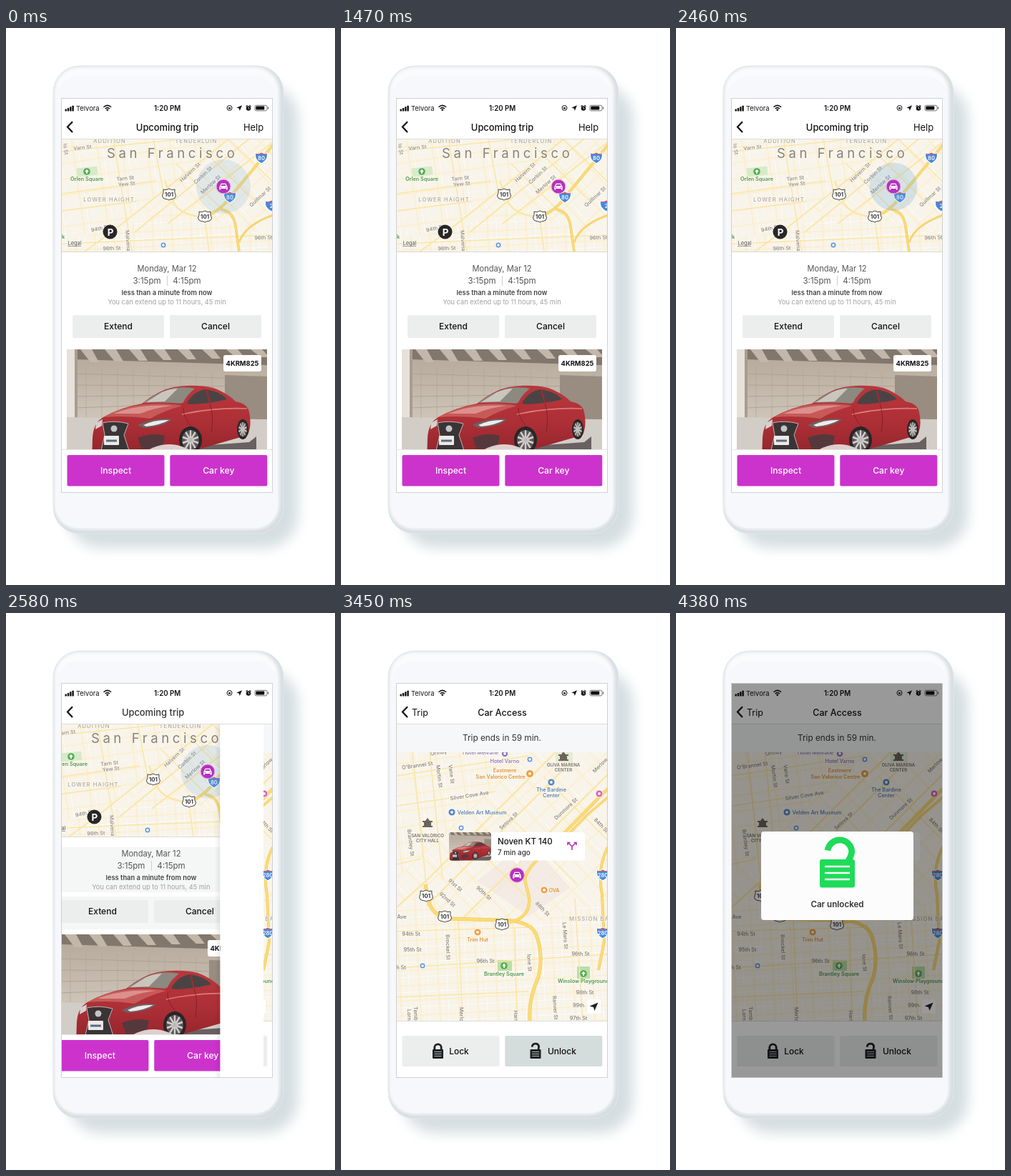
An HTML page that plays this animation: 460x780 px, repeating every 4500 ms.

```html
<!DOCTYPE html>
<html lang="en">
<head>
<meta charset="utf-8">
<title>Car access</title>
<style>
html, body { margin: 0; width: 100%; height: 100%; overflow: hidden; background: #fff; }
svg { display: block; width: 460px; height: 780px; font-family: Inter, Roboto, sans-serif; }
.halo { paint-order: stroke; stroke: #faf6ec; stroke-width: 1.6px; stroke-linejoin: round; }
</style>
</head>
<body>
<svg id="stage" viewBox="0 0 460 780" xmlns="http://www.w3.org/2000/svg"></svg>
<script>
const LEFT = 78, WIDTH = 295, LOOP = 4500;

const text = (x, y, s, size, o = {}) =>
  `<text x="${x}" y="${y}" font-size="${size}" font-weight="${o.w || 400}" fill="${o.c || '#111'}"
    text-anchor="${o.a || 'middle'}" letter-spacing="${o.ls || 0}" class="${o.k || ''}"
    ${o.r ? `transform="rotate(${o.r} ${x} ${y})"` : ''}>${s}</text>`;
const box = (x, y, w, h, fill, r = 0, more = '') =>
  `<rect x="${x}" y="${y}" width="${w}" height="${h}" rx="${r}" fill="${fill}" ${more}/>`;
const dot = (x, y, r, fill, more = '') => `<circle cx="${x}" cy="${y}" r="${r}" fill="${fill}" ${more}/>`;
const fill = (d, c, more = '') => `<path d="${d}" fill="${c}" ${more}/>`;
const line = (d, c, w, more = '') => `<path d="${d}" fill="none" stroke="${c}" stroke-width="${w}" ${more}/>`;
const at = (x, y, s, k = 1) => `<g transform="translate(${x} ${y}) scale(${k})">${s}</g>`;
const road = (d, w) => line(d, '#efc65e', w, 'stroke-linejoin="round"') + line(d, '#fbdb74', w - 1, 'stroke-linejoin="round"');
const street = (d, w = 1.5) => line(d, '#fbe6a6', w);

// Map labels: [text, x, y, rotation]
const labels = (list, c, size = 7.3, w = 500, ls = 0) =>
  list.map(([s, x, y, r]) => text(x, y, s, size, { c, w, r, ls, k: 'halo' })).join('');

const grid = (id, w, h, angle) => `<pattern id="${id}" patternUnits="userSpaceOnUse" width="${w}" height="${h}"
  patternTransform="rotate(${angle})">
  ${line(`M0 ${h / 2}H${w}M${w / 2} 0V${h}M${w / 4} 0V${h}`, '#f0eadc', 1.5)}
  ${line(`M0 ${h / 2}H${w}M${w / 2} 0V${h}M${w / 4} 0V${h}`, '#fff', .9)}
  ${line(`M0 1H${w}M1 0V${h}`, '#fbebbc', 1.1)}</pattern>`;

const interstate = (x, y, n) => at(x, y,
  fill('M-8-6Q-4-4 0-7Q4-4 8-6Q11 3 0 9Q-11 3-8-6Z', '#4a88d8', 'stroke="#fff" stroke-width="1.2"') +
  fill('M-8-5.5Q-4-4 0-6.5Q4-4 8-5.5L8.1-4.2H-8.1Z', '#d2605a') +
  text(0, 3.8, n, 7.6, { c: '#fff', w: 600 }));
const route = (x, y) => at(x, y,
  fill('M-8-7Q-4-5 0-8Q4-5 8-7Q7-3 9.5 2Q9 6 5 6.5Q2 6.5 0 8Q-2 6.5-5 6.5Q-9 6-9.5 2Q-7-3-8-7Z',
    '#fff', 'stroke="#444" stroke-width="1"') +
  text(0, 3, '101', 7.8, { c: '#333', w: 700 }));
const poi = (x, y, c, r = 4.5) => dot(x, y, r, c, 'stroke="#fff" stroke-width=".8"') +
  box(x - 1.7, y - 1.7, 3.4, 3.4, '#fff', 1);
const tree = (x, y) => dot(x, y, 4.8, '#56aa57') + fill(`M${x} ${y - 3.2}l3 3.4h-2v2.6h-2v-2.6h-2z`, '#fff');
const hall = (x, y) => fill(`M${x - 7} ${y + 6}v-2h2v-5h-2v-2h4l3-4l3 4h4v2h-2v5h2v2z`, '#6b645c');
const carPin = (x, y, r) => dot(x, y, r, '#b731bd', 'stroke="#e3b5e3" stroke-width="1"') + at(x, y,
  fill('M-3.4-4.2H3.4L4.8-1Q5.7-.3 5.7.8V4.4H3.8V3H-3.8V4.4H-5.7V.8Q-5.7-.3-4.8-1Z', '#fff') +
  fill('M-2.7-3.1H2.7L3.6-.9H-3.6Z', '#b731bd') + dot(-3.6, 1.2, .8, '#b731bd') + dot(3.6, 1.2, .8, '#b731bd'));

const padlock = (x, open) => at(x, 0,
  line(open ? 'M-4.8 607.6A4.8 4.8 0 0 1 4.6 606.5Q4.8 609 3.6 612' : 'M-4.7 613V608.5A4.7 4.7 0 0 1 4.7 608.5V613', '#1d2021', 2.8) +
  box(-7.5, 611, 15, 13, '#1d2021', 1) +
  line('M-5 614.5H5M-5 617.5H5M-5 620.5H5', '#c9cfce', .9));

const wall = () => {
  let s = '';
  for (let i = 0; i < 5; i++) s += line(`M97 ${484 + i * 16}L365 ${492 + i * 10}`, '#a79d91', .8);
  for (let i = 0; i < 12; i++) s += line(`M${112 + i * 22} ${474 + i}V546`, '#b0a69a', .7);
  for (let i = 0; i < 8; i++) s += fill(`M${104 + i * 34} 450h16l10 ${18 - i}h-12z`, '#c2b7a9');
  return s;
};
const wheel = (x, y, rx, ry) => {
  let spokes = '';
  for (let a = 0; a < 10; a++) spokes += line('M0 0L0-.72', '#d2cfcd', .15, `transform="rotate(${a * 36})"`);
  return `<g transform="translate(${x} ${y}) scale(${rx} ${ry})">${dot(0, 0, 1, '#2b2527')}
    ${dot(0, 0, .74, '#5e585a')}${spokes}${dot(0, 0, .18, '#bbb')}</g>`;
};
const photo = () => box(85, 450, 280, 154, 'url(#wallTone)') +
  fill('M97 450H365V472L97 464Z', '#82776d') + wall() +
  fill('M306 486L365 488V548H306Z', '#998c80') +
  box(85, 450, 11, 104, '#e6e1d9') + box(96, 450, 4, 104, '#a89d91') +
  fill('M85 545L365 548V604H85Z', '#d2cdc6') +
  fill('M116 596L340 580L350 572V604H116Z', '#696161') +
  fill('M120 604L121 574Q122 553 136 545Q161 531 190 526Q214 507 234 503Q264 498 290 504Q309 511 321 523Q338 526 340 538Q344 556 338 570L276 588L232 600Z', 'url(#paint)') +
  fill('M136 545Q163 530 193 527Q226 525 246 529Q220 536 202 547Q168 542 136 545Z', '#c65a59') +
  fill('M150 540Q172 531 200 529Q222 528 232 529Q206 532 188 540Z', '#dc908c') +
  fill('M192 525Q216 507 236 504Q251 502 264 505Q252 514 247 526Q218 523 192 525Z', '#8c8980') +
  fill('M196 524L218 510Q230 505 240 505L222 523Z', '#c9c7bd') +
  fill('M252 527Q261 509 279 506Q300 509 309 520Q283 527 252 527Z', '#4a4344') +
  line('M280 506L285 525', '#a8282f', 2) +
  line('M246 541Q292 531 337 533', '#df7b78', 1.6) +
  line('M248 529Q246 552 275 571M285 526Q291 542 287 566', '#7d1b23', .8) +
  fill('M244 526q8-4 12 1q-1 6-9 5z', '#b33036') +
  fill('M184 556Q206 545 232 548Q222 558 192 560Z', '#6d6164') +
  fill('M192 556Q208 548 228 549Q216 556 196 558Z', '#efecea') +
  fill('M126 553L135 548L134 557L125 562Z', '#d6d0cf') +
  fill('M135 553Q152 549 171 554L165 570L176 604H130L138 570Z', '#3a3437', 'stroke="#bdb5b4" stroke-width="1"') +
  dot(151, 561, 4.5, '#c4c4c6') +
  box(137, 571, 21, 13, '#eceae4', 1) + line('M140 578H155', '#586a88', 3) +
  fill('M184 574Q204 566 222 571L219 586L190 590Z', '#55383c') +
  wheel(258, 577, 16, 19) + wheel(331, 562, 8, 14);

const statusBar = () => [0, 1, 2, 3].map(i => box(82.5 + i * 3.3, 113.5 - i * 1.6, 2.4, 3 + i * 1.6, '#111', .5)).join('') +
  text(98, 115.8, 'Telvora', 9.35, { a: 'start' }) +
  line('M136.5 110.8Q141.8 106 147.1 110.8M138.6 113Q141.8 110.2 145 113', '#111', 1.5) +
  fill('M139.9 114.2Q141.8 112.6 143.7 114.2L141.8 116.4Z', '#111') +
  text(225.6, 115.8, '1:20 PM', 9.7, { w: 600 }) +
  dot(312.5, 112, 3.5, 'none', 'stroke="#111" stroke-width="1"') + box(311, 111.3, 3, 2.2, '#111') +
  fill('M330 108.3L326.8 116L325.8 112.6L322.2 111.8Z', '#111') +
  dot(339, 112.5, 3.2, '#111') + line('M335.6 109.8l2-1.5M342.4 109.8l-2-1.5', '#111', 1.1) +
  line('M339 110.7V112.7L340.4 113.3', '#fff', .8) +
  box(348, 108.3, 17, 7.6, 'none', 1.8, 'stroke="#555" stroke-width=".8"') +
  box(349.3, 109.6, 12, 5, '#111', .8) + box(366, 110.6, 1.2, 3, '#666', .5);

const tripMap = () => box(78, 155, 295, 158, '#f9f4e9') +
  fill('M78 155H312L150 284L78 296Z', 'url(#west)') +
  fill('M312 155H373V290L278 266L238 248L180 262Z', 'url(#soma)') +
  fill('M78 296L150 284L238 250L278 268L373 292V313H78Z', 'url(#south)') +
  box(99, 195, 29, 12, '#d6ebc9', 0, 'transform="rotate(-6 113 201)"') +
  street('M78 173L280 152M78 232L210 214M78 256L182 243M150 155L176 313M206 155L222 240M278 268L284 313M78 302L373 290') +
  street('M110 313L150 284L312 155M180 286L340 155M226 274L373 160', 2) +
  street('M238 190L310 262M270 165L350 245M310 155L373 215') +
  street('M222 214L232 240Q240 262 278 265', 2.4) +
  road('M278 265Q302 254 313 237L357 184L373 164', 4) +
  road('M300 254Q318 256 321 278L326 313', 3.6) +
  road('M326 300Q334 276 373 262', 2.6) +
  labels([['ADDITION', 145, 161], ['TENDERLOIN', 266, 161], ['LOWER HAIGHT', 144, 243]], '#a09a92', 7.6, 400, 1.1) +
  text(141, 182, 'San Francisco', 18.5, { a: 'start', c: '#85817c', ls: 4.6, k: 'halo' }) +
  labels([['Varn St', 107, 170, -6], ['Tarn St', 167, 213, -6], ['Yew St', 169, 221, -6], ['Halvern St', 259, 204, -43],
    ['Corbin St', 277, 208, -43], ['Merlow St', 288, 221, -43], ['Quillmar St', 357, 238, -43], ['94th St', 132, 283, -12],
    ['Malvena', 168, 298, 86], ['96th St', 148, 311, -2], ['96th St', 360, 296, -2], ['lo St', 81, 170, 82]], '#8f8880') +
  labels([['Orlen Square', 113, 214], ['k', 80, 295]], '#4d9a4f', 7.3, 600) + tree(113, 201) +
  text(96, 304, 'Legal', 7.4, { c: '#555', k: 'halo' }) + line('M86 305.5H105', '#666', .6) +
  poi(220, 304, '#5b90d2', 4) + route(228, 233) + route(278, 264) +
  interstate(357, 181, '80') + interstate(313, 236, '80') + interstate(371, 248, '2') +
  dot(145.5, 285.5, 10, '#272727') + text(146, 290.5, 'P', 13.5, { c: '#fff', w: 700 }) +
  `<circle id="pulse" cx="304" cy="222" fill="#62a3d6"/>` + carPin(304, 222, 10);

const greyButton = (x, s) => box(x, 402, 128, 32, '#eceeee', 2) + text(x + 64, 422.3, s, 12, { w: 500 });
const pinkButton = (x, s) => box(x, 598, 136, 43.5, '#cc33cc', 2) + text(x + 68, 624, s, 12.2, { c: '#fff', w: 500 });

const tripScreen = () => box(78, 155, 295, 496, '#fff') + tripMap() + line('M78 313.5H373', '#d9d9d9', 1) +
  `<g id="shade">${box(78, 328, 295, 63, '#f5f6f6')}${box(78, 397, 295, 46, '#f5f6f6')}</g>` +
  text(225, 341, 'Monday, Mar 12', 11.1, { c: '#555' }) +
  text(197, 358.3, '3:15pm', 11.5, { c: '#555' }) + text(253, 358.3, '4:15pm', 11.5, { c: '#555' }) +
  line('M225.5 347V361', '#ccc', 1) +
  text(225, 374.3, 'less than a minute from now', 9.35, { w: 600, c: '#444' }) +
  text(225, 386.5, 'You can extend up to 11 hours, 45 min', 9.25, { c: '#a0a0a0' }) +
  greyButton(93, 'Extend') + greyButton(229, 'Cancel') +
  `<g clip-path="url(#photoClip)"><use href="#photo"/>${dot(228, 639, 56, '#e9e6e3', 'opacity=".88"')}</g>` +
  box(304, 458, 53, 23, '#fff', 3) + text(330.5, 473.2, '4KRM825', 9.4, { w: 700 }) +
  box(78, 590, 295, 61, '#fff') + line('M78 590.5H373', '#e6e6e6', 1) +
  pinkButton(85.5, 'Inspect') + pinkButton(229.3, 'Car key');

const accessMap = () => box(78, 195, 295, 376, '#f9f4e9') +
  fill('M78 195H262L78 372Z', 'url(#west)') +
  fill('M262 195H373V400L262 436L150 428L118 390L78 410V372Z', 'url(#soma)') +
  fill('M78 410L118 390L150 428L262 436L373 400V571H78Z', 'url(#south)') +
  fill('M300 195h24v14h-24z', '#e4ecd2') + fill('M190 375L262 318L320 385L262 425Z', '#f0e6e2', 'opacity=".6"') +
  box(219, 486, 20, 15, '#b9dfa6') + box(330, 495, 18, 17, '#b9dfa6') +
  street('M78 228L262 200M78 270L216 250M78 352L112 344M124 195L142 372M100 195L120 390') +
  street('M78 412L118 376L300 195M120 410L320 210M170 428L373 226', 2.4) +
  street('M180 320L262 400M226 275L330 380M284 230L373 318') +
  street('M78 446L262 440M78 497L373 478M164 430L170 571M243 440L246 571M327 400L338 571M78 538L262 530') +
  road('M118 380L121 398Q126 424 150 428L222 430Q262 430 272 448Q284 478 276 510Q262 540 264 571', 5) +
  road('M232 434Q266 428 263 398L257 374Q258 360 284 336L330 290L373 246', 4.4) +
  road('M314 314L344 283L373 258', 3.4) + road('M373 328Q358 356 365 395L368 460L360 500', 4) +
  labels([['Ormby', 137, 198, -8], ["O'Brannel St", 107, 216, -8], ['Mortin St', 135, 229, 83], ['Vane St', 152, 226, 83],
    ['Silver Cove Ave', 180, 258, -9], ['Brantley St', 95, 322, 83], ['Selova St', 236, 293, -43], ['Dunmore St', 316, 276, -43],
    ['Merlow', 364, 215, -45], ['84th St', 362, 299, 46], ['90th St', 198, 394, 42], ['91st St', 158, 383, 42],
    ['92nd St', 147, 403, 42], ['88th St', 280, 416, 46]], '#857e76') +
  labels([['Ave', 85, 428], ['94th St', 98, 452], ['95th St', 100, 474], ['h St', 84, 499], ['96th St', 202, 490],
    ['96th St', 335, 480], ['Brockel St', 147, 468, 88], ['Ione St', 261, 490, 86], ['Le Maro St', 311, 452, 86],
    ['98th St', 341, 534], ['99th', 332, 552], ['97th St', 332, 570], ['Ranver St', 297, 553, 86], ['Lorn', 93, 563, 88],
    ['Tembl', 102, 562, 88], ['Merlo', 166, 562, 88], ['Harn', 242, 565, 88]], '#857e76') +
  labels([['Hotel Melvane', 195, 198], ['Hotel Varno', 229, 210]], '#8570bb', 7.3, 500) +
  labels([['Eastmere', 229, 223], ['San Valorico Centre', 223, 232], ['Trim Hut', 191, 460], ['OVA', 298, 391]], '#e0913a', 7.2, 600) +
  labels([['The Bardine', 294, 249.5], ['Center', 294, 258], ['Velden Art Museum', 197, 282]], '#4d78ad', 7.3, 500) +
  labels([['OLIVA MARENA', 311, 214.5], ['CENTER', 311, 221.5], ['SAN VALORICO', 121, 313.5], ['CITY HALL', 121, 321]], '#776f66', 6.1, 600) +
  labels([['Brantley Square', 228, 508], ['Winslow Playground', 339, 517.5]], '#4d9a4f', 7.3, 600) +
  text(319, 431, 'MISSION BAY', 7.7, { a: 'start', c: '#a09a92', ls: 1.1, k: 'halo' }) +
  poi(229, 197, '#8570bb') + poi(264, 205, '#5b90d2', 4) + poi(264, 225, '#eca042', 5.5) + poi(294, 237, '#5b86bf', 5) +
  poi(155, 279, '#5b86bf', 5) + poi(168, 301, '#5b90d2', 4) + poi(361, 253, '#d668ae', 5) + poi(284, 388, '#eca042', 5) +
  poi(191, 447, '#eca042', 5) + poi(114, 494, '#5b90d2', 4) + hall(311, 201) + hall(121, 294) +
  tree(228, 494) + tree(339, 505) + route(119, 396) + route(145, 425) + route(225, 436) +
  interstate(366, 366, '280') + interstate(366, 447, '280') +
  box(344, 541, 19, 20, '#fff', 2) + fill('M359.5 545.5L354.5 557L353 552L347.5 550.5Z', '#222');

const accessScreen = () => box(78, 155, 295, 496, '#fff') +
  `<g clip-path="url(#mapClip)">${accessMap()}</g>` + line('M78 571.5H373', '#ddd', 1) +
  box(78, 155, 295, 40, '#f6f7f8') + text(225, 179, 'Trip ends in 59 min.', 11.8, { c: '#333' }) +
  box(151, 307, 190, 39.5, '#fff', 4) + fill('M241 346H251L246 352Z', '#fff') +
  `<g clip-path="url(#thumbClip)"><use href="#photo" transform="translate(120.8 190) scale(.26)"/></g>` +
  text(219, 324, 'Noven KT 140', 11.5, { a: 'start', w: 500 }) + text(219, 338.5, '7 min ago', 9.9, { a: 'start', w: 500, c: '#333' }) +
  line('M323 332V327L318 322M323 327L328 322M317 325V321.5H320.5M325.5 321.5H329V325', '#b731bd', 1.6) +
  carPin(246, 367, 10.3) +
  box(85.5, 592, 136, 43, '#eceeee', 2) + box(229.3, 592, 136, 43, '#eceeee', 2, 'id="unlock"') +
  padlock(135.5) + padlock(272, true) +
  text(165, 618, 'Lock', 12, { w: 500 }) + text(309, 618, 'Unlock', 12, { w: 500 });

const dialog = () => box(119, 306, 213, 124, '#fcfcfd', 4) +
  line('M212 332.5A17 17 0 0 1 245.8 334Q245.5 339 241 347', '#1fdb59', 8.8) +
  box(201, 345, 49, 39.5, '#1fdb59', 3) + line('M208 355H243M208 364H243M208 373H243', '#fcfcfd', 2.6) +
  text(225.5, 412, 'Car unlocked', 11.6, { w: 600, c: '#333' });

const clip = (id, x, y, w, h, r = 0) => `<clipPath id="${id}">${box(x, y, w, h, '#000', r)}</clipPath>`;
const shade = (id, dir, stops) => `<linearGradient id="${id}" ${dir}>${stops.map(([o, c]) =>
  `<stop offset="${o}" stop-color="${c}"/>`).join('')}</linearGradient>`;
const blur = (id, n) => `<filter id="${id}" x="-20%" y="-20%" width="140%" height="140%"><feGaussianBlur stdDeviation="${n}"/></filter>`;

document.getElementById('stage').innerHTML = `<defs>
  ${grid('west', 34, 22, -8)}${grid('soma', 30, 36, -43)}${grid('south', 27, 21, -3)}
  ${shade('wallTone', 'x1="0" x2="0" y1="0" y2="1"', [[0, '#b3a799'], [.6, '#cdc3b6']])}
  ${shade('paint', 'x1="0" x2="0" y1="0" y2="1"', [[0, '#b8383c'], [.5, '#ad2f36'], [1, '#8f232b']])}
  ${shade('edge', '', [[0, '#00000000'], [1, '#00000014']])}
  ${blur('soft', 9)}${blur('bevel', 2.5)}
  ${clip('body', 66, 53, 322, 655, 37)}
  ${clip('screenClip', 78, 98.5, 294.5, 552.5)}${clip('photoClip', 85, 450, 280, 140)}
  ${clip('mapClip', 78, 195, 295, 376)}${clip('thumbClip', 151, 307, 59, 39.5, 4)}
  <clipPath id="reveal"><rect id="revealBox" y="155" width="300" height="496"/></clipPath>
  <g id="photo">${photo()}</g></defs>
  ${box(86, 80, 322, 648, '#cdd8db', 46, 'filter="url(#soft)" opacity=".85"')}
  <g clip-path="url(#body)">
    ${box(66, 53, 322, 655, '#d6dde1')}
    ${box(67, 54, 315, 648, '#fafbfd', 35, 'filter="url(#bevel)"')}
    ${box(70, 67, 310, 633, '#f7f8fb', 32)}
  </g>
  ${box(66, 53, 322, 655, 'none', 37, 'stroke="#e3e8eb" stroke-width="1"')}
  <g clip-path="url(#screenClip)">
    <g id="trip">${tripScreen()}</g>
    <g id="panel">${box(70, 155, 8, 496, 'url(#edge)')}${box(78, 155, 300, 496, '#fff')}</g>
    <g id="access" clip-path="url(#reveal)">${accessScreen()}</g>
    ${box(78, 98, 295, 57.5, '#fff')}${line('M78 155.5H373', '#dcdcdc', 1)}${statusBar()}
    ${line('M93 131.3L86 138.6L93 145.9', '#111', 2.2)}
    <g id="tripTitle">${text(225.5, 143.5, 'Upcoming trip', 12.9, { w: 500 })}</g>
    <g id="help">${text(346, 143.5, 'Help', 12.9)}</g>
    <g id="accessTitle">${text(225.5, 143.5, 'Car Access', 12.5, { w: 500 })}</g>
    <g id="back">${text(99, 143.5, 'Trip', 12.5, { a: 'start' })}</g>
    ${box(78, 98, 295, 553, '#000', 0, 'id="dim"')}
  </g>
  ${box(77.5, 98.5, 295, 552, 'none', 0, 'stroke="#c3c6c8" stroke-width=".8"')}
  <g id="dialog">${dialog()}</g>`;

const set = (id, attrs) => {
  const el = document.getElementById(id);
  for (const k in attrs) el.setAttribute(k, attrs[k]);
};
const clamp = v => Math.max(0, Math.min(1, v));
const spring = (ms, rate) => {
  const x = Math.max(0, ms) * rate / 1000;
  return 1 - (1 + x) * Math.exp(-x);
};
const shift = x => `translate(${x} 0)`;

function draw(t) {
  const beat = (t + 840) % 2600;
  set('pulse', { r: Math.min(41, 38 * (beat / 840) ** .7), opacity: .6 * clamp(1 - beat / 1150) });

  const p = t > 3150 ? 1 : spring(t - 2500, 12);
  const moving = p > 0;
  set('trip', { transform: shift(-.3 * WIDTH * p) });
  set('shade', { opacity: clamp(p * 5) });
  set('panel', { transform: shift(WIDTH * (1 - p)), opacity: moving ? 1 : 0 });
  set('revealBox', { x: LEFT + WIDTH * (1 - p ** 2.25) });
  set('tripTitle', { transform: shift(-80 * p), opacity: clamp(1.25 - p * 1.6) });
  set('help', { opacity: clamp(1 - p * 5) });
  set('accessTitle', { transform: shift(100 * (1 - p)), opacity: clamp((p - .4) / .6) });
  set('back', { transform: shift(50 * (1 - p)), opacity: clamp((p - .4) / .6) });

  set('unlock', { fill: t >= 3390 && t < 3540 ? '#d4dddc' : '#eceeee' });
  const shown = 1 - Math.exp(-Math.max(0, t - 3500) / 45);
  const size = 1.2 - .2 * spring(t - 3500, 22);
  set('dim', { opacity: .4 * shown });
  set('dialog', { opacity: shown, transform: `translate(225.5 368) scale(${size}) translate(-225.5 -368)` });
}

function tick() {
  const t = performance.now() % LOOP;
  draw(Math.min(4380, Math.floor(t / 30) * 30));
  requestAnimationFrame(tick);
}
tick();
</script>
</body>
</html>
```
